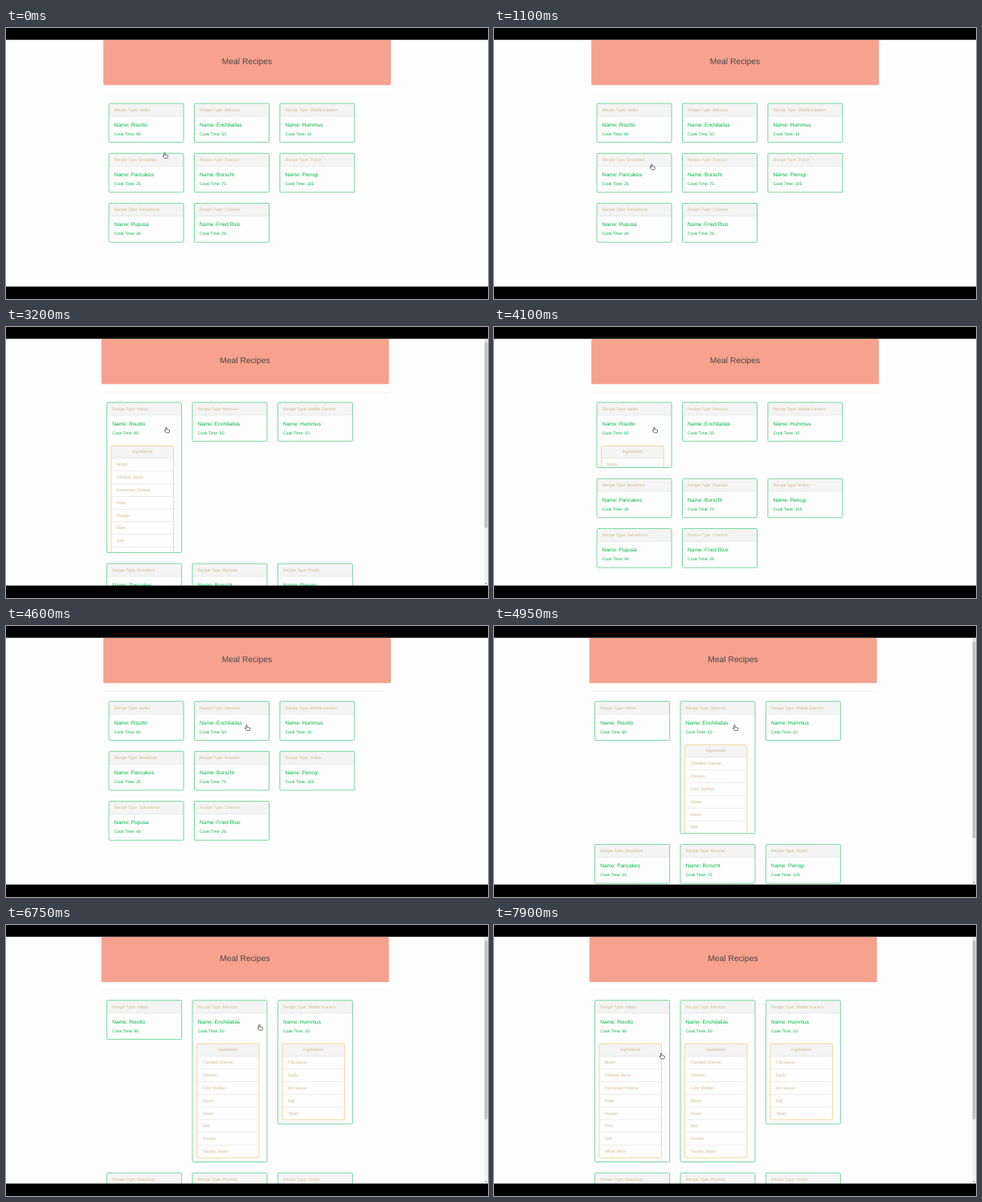
Write an HTML page that moves like this. It is 600 px wide and 338 px high and loops after 8000 ms.

```html
<!DOCTYPE html>
<html lang="en">
<head>
<meta charset="utf-8">
<title>Meal Recipes</title>
<style>
html, body { margin: 0; width: 100%; height: 100%; overflow: hidden; background: #fdfdfd; }
svg { display: block; width: 100vw; height: 100vh; }
text { font-family: "Liberation Sans", Arial, sans-serif; text-rendering: geometricPrecision; }
.tan { font-size: 5.12px; fill: #d3b98b; }
.name { font-size: 6.5px; fill: #00b548; }
.time { font-size: 5.12px; fill: #00b548; }
</style>
</head>
<body>
<svg id="stage" viewBox="0 0 600 338" xmlns="http://www.w3.org/2000/svg"></svg>
<script>
const LOOP = 8000, SLIDE = 560;
const CARD_W = 93, CARD_H = 48.6, PITCH_X = 106.4, PITCH_Y = 62.3;
const LEFT = 128.1, TOP = 94, ROW = 15.8, PAD = 10.7;
const VIEW_TOP = 15, VIEW_H = 307.5, BAR_W = 4.8;

const recipes = [
  { type: "Italian", name: "Risotto", time: 60, items: "Butter,Chicken Stock,Parmesan Cheese,Peas,Pepper,Rice,Salt,White Wine", clicks: [2780, 3765, 7180] },
  { type: "Mexican", name: "Enchiladas", time: 50, items: "Cheddar Cheese,Chicken,Corn Tortillas,Olives,Onion,Salt,Tomato,Tomato Sauce", clicks: [4630] },
  { type: "Middle Eastern", name: "Hummus", time: 10, items: "Chickpeas,Garlic,Hot Sauce,Salt,Tahini", clicks: [5760] },
  { type: "Breakfast", name: "Pancakes", time: 25 },
  { type: "Russian", name: "Borscht", time: 75 },
  { type: "Polish", name: "Pierogi", time: 105 },
  { type: "Salvadoran", name: "Pupusa", time: 40 },
  { type: "Chinese", name: "Fried Rice", time: 28 }
];

// time, x, y of the pointer
const pointerPath = [
  [0, 198.5, 159], [800, 197, 172], [1700, 198, 177], [2050, 200, 130],
  [2300, 200.5, 128.5], [4360, 200.5, 128.5], [4600, 300.5, 127],
  [5450, 300.5, 127], [5500, 302, 127], [5720, 398, 127],
  [6450, 398, 127], [7130, 201, 129], [7720, 201, 129], [7900, 209.3, 163.5], [8000, 209.3, 163.5]
];

const svg = document.getElementById("stage");

function add(parent, tag, attrs, text) {
  const el = document.createElementNS("http://www.w3.org/2000/svg", tag);
  set(el, attrs);
  if (text) el.textContent = text;
  parent.appendChild(el);
  return el;
}
function set(el, attrs) {
  for (const k in attrs) el.setAttribute(k, attrs[k]);
}
const rect = (p, x, y, width, height, fill, more) =>
  add(p, "rect", { x, y, width, height, fill, ...more });
const label = (p, x, y, cls, s, more) =>
  add(p, "text", { x, y, class: cls, ...more }, s);
const rule = (p, x, y, w, color) => rect(p, x, y, w, 0.5, color);

function buildIngredients(g, items) {
  const x = 5.4, y = 54.1, w = 77.6, h = (items.length + 1) * ROW;
  rect(g, x, y, w, ROW, "#f4f4f4", { rx: 1.2 });
  label(g, x + w / 2, y + 9.2, "tan", "Ingredients", { "text-anchor": "middle" });
  items.forEach((item, i) => {
    const top = y + (i + 1) * ROW;
    rule(g, x, top - 0.25, w, "#dcdcdc");
    label(g, x + 6.9, top + 9.4, "tan", item);
  });
  rect(g, x, y, w, h, "none", { rx: 1.4, stroke: "#f1cd7c", "stroke-width": 0.75 });
}

function buildCard(parent, r, i) {
  const g = add(parent, "g", {});
  const clip = add(g, "clipPath", { id: "clip" + i });
  r.mask = rect(clip, 0, 0, CARD_W, CARD_H, "#fff", { rx: 1.4 });
  const body = add(g, "g", { "clip-path": `url(#clip${i})` });
  rect(body, 0, 0, CARD_W, 16, "#f4f4f4");
  rule(body, 0, 15.7, CARD_W, "#d9dcda");
  label(body, 6.6, 9.5, "tan", "Recipe Type: " + r.type);
  label(body, 6.6, 28.5, "name", "Name: " + r.name);
  label(body, 6.6, 39.5, "time", "Cook Time: " + r.time);
  if (r.items) {
    const items = r.items.split(",");
    r.extra = (items.length + 1) * ROW + PAD;
    buildIngredients(body, items);
  }
  r.frame = rect(g, 0, 0, CARD_W, CARD_H, "none", { rx: 1.4, stroke: "#55cf8c", "stroke-width": 0.8 });
  r.group = g;
}

rect(svg, 0, 0, 600, 338, "#fdfdfd");
const page = add(svg, "g", {});
rect(page, 121.2, VIEW_TOP, 358, 56.2, "#f6a28e", { rx: 1.6 });
label(page, 300, 45.4, "", "Meal Recipes", { "text-anchor": "middle", "font-size": 10.3, fill: "#4a4647" });
rule(page, 121.2, 81, 358, "#ececec");
recipes.forEach((r, i) => buildCard(page, r, i));

const bar = add(svg, "g", {});
rect(bar, 600 - BAR_W, VIEW_TOP, BAR_W, VIEW_H, "#f1f1f1");
const thumb = rect(bar, 600 - BAR_W + 0.5, VIEW_TOP + 4.3, BAR_W - 1, 10, "#c1c1c1");
add(bar, "path", { d: "M596.5 18l1.1-1.3 1.1 1.3z", fill: "#999" });
add(bar, "path", { d: "M596.5 319.5l1.1 1.3 1.1-1.3z", fill: "#505050" });

const hand = add(svg, "path", {
  d: "M-1.7 .6V-2.7q0-.8.65-.8t.65.8V-.7q1-.5 1.3.15 1-.3 1.15.3 1-.1 1 .7V1.6q0 1-.65 1.8H-1.1Q-2.2 2-3 .7q-.25-.8.5-.8z",
  fill: "#fff", stroke: "#222", "stroke-width": 0.65, "stroke-linejoin": "round"
});

rect(svg, 0, 0, 600, VIEW_TOP - 0.3, "#000");
rect(svg, 0, VIEW_TOP + VIEW_H, 600, 20, "#000");

// cubic-bezier(0, 0, .58, 1)
function easeOut(t) {
  if (t <= 0) return 0;
  if (t >= 1) return 1;
  let lo = 0, hi = 1;
  for (let i = 0; i < 22; i++) {
    const s = (lo + hi) / 2;
    if (1.74 * s * s * (1 - s) + s * s * s < t) lo = s; else hi = s;
  }
  return 3 * lo * lo - 2 * lo * lo * lo;
}

function openness(r, t) {
  return (r.clicks || []).reduce((sum, c, i) =>
    sum + (i % 2 ? -1 : 1) * easeOut((t - c) / SLIDE), 0);
}

function pointerAt(t) {
  let i = 0;
  while (i < pointerPath.length - 2 && t >= pointerPath[i + 1][0]) i++;
  const [t0, x0, y0] = pointerPath[i], [t1, x1, y1] = pointerPath[i + 1];
  const k = Math.min(1, (t - t0) / (t1 - t0)), s = k * k * (3 - 2 * k);
  return [x0 + (x1 - x0) * s, y0 + (y1 - y0) * s];
}

function draw(t) {
  const grown = recipes.map(r => (r.extra || 0) * openness(r, t));
  const push = Math.max(...grown);
  recipes.forEach((r, i) => {
    const row = Math.floor(i / 3);
    const x = LEFT + (i % 3) * PITCH_X, y = TOP + row * PITCH_Y + (row ? push : 0);
    set(r.group, { transform: `translate(${x} ${y})` });
    set(r.mask, { height: CARD_H + grown[i] });
    set(r.frame, { height: CARD_H + grown[i] });
  });
  const content = 259 + push, scrolls = content > VIEW_H;
  set(page, { transform: `translate(${scrolls ? -2.5 : 0} 0)` });
  set(bar, { visibility: scrolls ? "visible" : "hidden" });
  set(thumb, { height: Math.min(1, VIEW_H / content) * 299 });
  set(hand, { transform: `translate(${pointerAt(t).join(" ")})` });
}

function tick() {
  draw(performance.now() % LOOP);
  requestAnimationFrame(tick);
}
tick();
</script>
</body>
</html>
```
